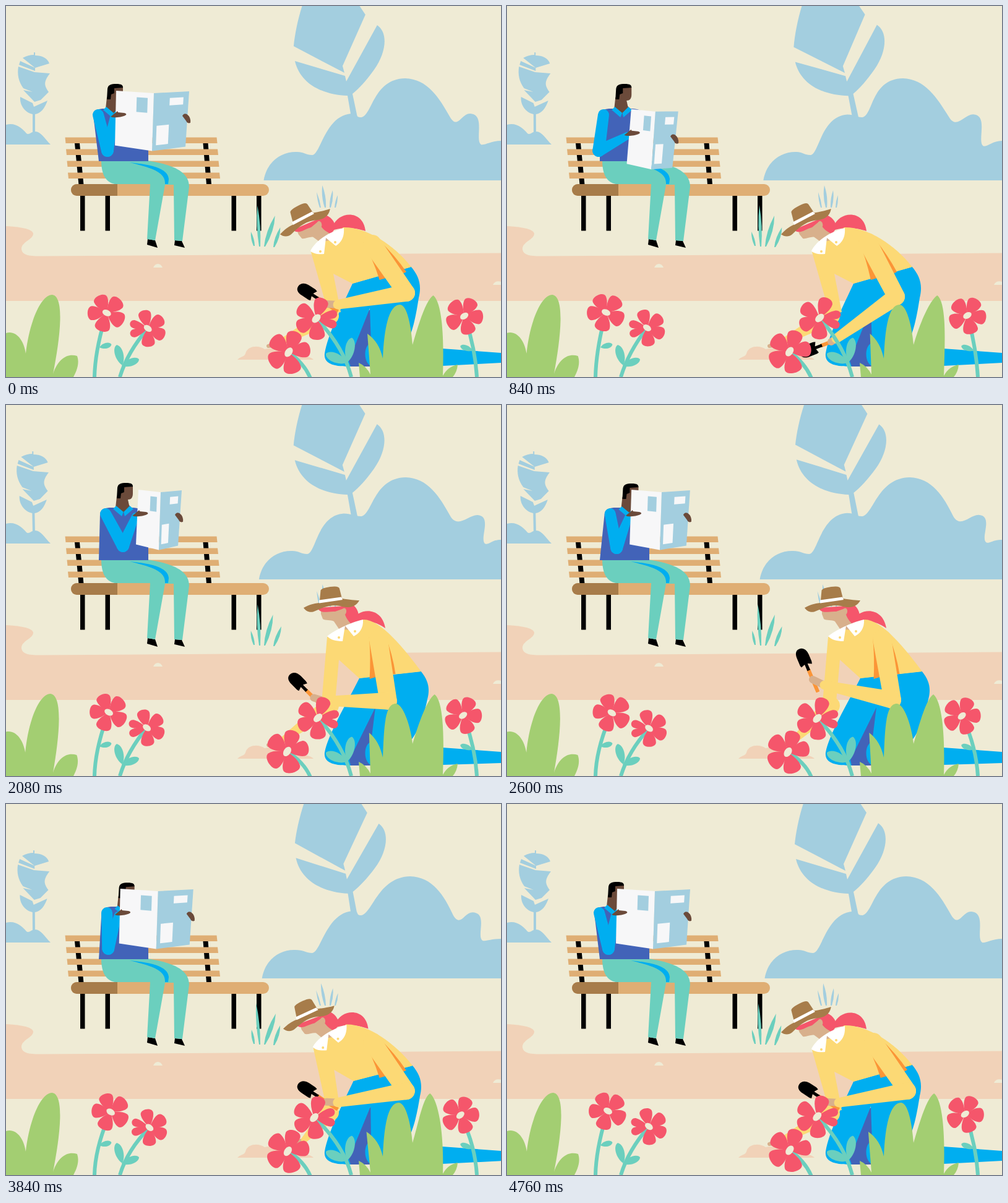
An HTML page for the animation above (4.8 s loop, 800x600 px).

```html
<!DOCTYPE html>
<html lang="en">
<head>
<meta charset="utf-8">
<title>Park afternoon</title>
<style>
html, body { margin: 0; width: 100%; height: 100%; overflow: hidden; background: #efebd5; }
svg { display: block; width: 800px; height: 600px; }
</style>
</head>
<body>
<svg id="stage" viewBox="0 0 800 600"></svg>
<script>
const LOOP = 4800, STEP = 40;
const C = {
  bg: '#efebd5', sky: '#a3cedf', sand: '#f1d2b8', wood: '#dfae74', dark: '#a77c4a',
  teal: '#6bcfbe', blue: '#00aef0', navy: '#4263b8', brown: '#6b4a3a', paper: '#f7f7f8',
  green: '#a3ce72', red: '#f5566b', yellow: '#fcd975', orange: '#fb9537', tan: '#d8b08c',
  white: '#fff', black: '#000'
};
let now = 0;

// Eased progress of the loop time from a to b.
function ease(a, b) {
  const u = Math.min(1, Math.max(0, (now - a) / (b - a)));
  return u * u * (3 - 2 * u);
}

// One swing per loop, highest at the peak time.
const wave = (mid, amp, peak) => mid + amp * Math.cos(2 * Math.PI * (now - peak) / LOOP);

const lerp = (a, b, u) => a + (b - a) * u;
const lerpPt = (a, b, u) => [lerp(a[0], b[0], u), lerp(a[1], b[1], u)];
const add = (p, x, y) => [p[0] + x, p[1] + y];
const path = (d, fill) => `<path d="${d}" fill="${fill}"/>`;
const poly = (pts, fill) => path('M' + pts.map(p => p.join(' ')).join('L') + 'Z', fill);
const rect = (x, y, w, h, fill, r = 0) =>
  `<rect x="${x}" y="${y}" width="${w}" height="${h}" rx="${r}" fill="${fill}"/>`;
const group = (transform, body) => `<g transform="${transform}">${body}</g>`;
const dot = (p, r, fill) => `<circle cx="${p[0]}" cy="${p[1]}" r="${r}" fill="${fill}"/>`;

// Blend two paths that share the same commands.
function mix(a, b, u) {
  const to = b.match(/-?[\d.]+/g);
  let i = 0;
  return a.replace(/-?[\d.]+/g, n => lerp(+n, +to[i++], u).toFixed(2));
}

// Tapered rounded segment.
function limb(a, ra, b, rb, fill) {
  const dx = b[0] - a[0], dy = b[1] - a[1], len = Math.hypot(dx, dy) || 1;
  const at = (p, r) => `${p[0] - dy / len * r} ${p[1] + dx / len * r}`;
  return path(`M${at(a, ra)}L${at(b, rb)}A${rb} ${rb} 0 0 0 ${at(b, -rb)}` +
    `L${at(a, -ra)}A${ra} ${ra} 0 0 0 ${at(a, ra)}Z`, fill);
}

// Lean a shape sideways about its base; dx is the shift at height h.
const sway = (y, h, dx, body) =>
  group(`matrix(1 0 ${-dx / h} 1 ${dx * y / h} 0)`, body);

function backdrop() {
  const small = path('M45 75H47V80C58 80 67 84 70 93L47 100L27 84Q36 79 45 79Z' +
    'M23 89L47 100V105L21 95Z' +
    'M20 98L46 107L71 109C60 123 62 129 69 139L56 152L46 155L28 136L43 139L28 133C20 122 18 110 20 98Z' +
    'M23 147L43 157L45 163L67 153C63 165 56 174 47 175V207H43V175C30 172 22 160 23 147Z', C.sky);
  const tall = path('M480 -4C472 20 467 45 465 65L547 108L544 97L581 14L569 -4Z' +
    'M467 89L548 113L550 122L600 31C618 43 615 75 595 103C582 121 571 133 560 142' +
    'L568 180H558L552 145C515 144 476 128 467 89Z', C.sky);
  const l = wave(412.5, 4, 0), c = wave(491, 4.5, 4300), m = wave(553, 8, 4160);
  const my = wave(174.5, 1.5, 1500), x = wave(647, 7.5, 3400), d = wave(729, 4.5, 3400);
  const b = wave(756, 6, 2400), by = wave(176, 2, 2300);
  const e = wave(772, 3.5, 2400), ey = wave(224, 3, 1100);
  const bush = `M${l} 282C${l + 5} 252 ${l + 28} 235 ${l + 54} 236` +
    `C${c - 14} 236 ${c - 9} 241 ${c} 241C${c + 14} 241 ${m - 43} ${my + 3} ${m} ${my}` +
    `C${m + 12} ${my} 564 180 574 180C592 178 ${x - 52} 118 ${x} 117` +
    `C${x + 36} 118 ${x + 55} 148 ${d - 10} 180C${d + 2} 200 ${b - 14} ${by} ${b} ${by}` +
    `C${b + 26} ${by + 1} ${e - 12} ${ey - 6} ${e} ${ey}C${e + 8} ${ey} 785 218 800 218V282Z`;
  return rect(0, 0, 800, 600, C.bg) +
    path('M0 192C16 188 26 198 33 206C37 209 40 204 46 203C56 202 62 214 72 224H0Z', C.sky) +
    sway(207, 110, wave(-1.2, 1.2, 0), small) +
    group(`rotate(${wave(.1, 1, 3480)} 562 175)`, tall) +
    path(bush, C.sky) +
    path('M0 356C20 357 43 360 44 368C44 378 25 381 25 393C26 405 43 404.5 60 404.5L800 399.5V477H0Z', C.sand) +
    path('M238 423C241 415 250 415 253 423ZM787 451C790 444 797 445 800 446V451Z', C.bg) +
    path('M374 572C380 566 385 568 387 562C391 548 410 549 418 555C430 553 445 552 455 560C470 567 490 564 497 572Z', C.sand);
}

function bench() {
  let slats = '';
  for (let i = 0; i < 4; i++) {
    slats += path(`M${95.5 + 1.5 * i} ${212.5 + 19 * i}h245l1 9.5h-245z`, C.wood);
  }
  return path('M111 222H119L125.5 289H117.5ZM318.5 222H326.5L332 289H324Z', C.black) + slats +
    [120, 160.5, 364.5, 405].map(x => rect(x, 306, 7.5, 57.5, C.black)).join('') +
    rect(105, 288, 320, 19, C.wood, 9.5) +
    path('M180 288H114.5A9.5 9.5 0 0 0 114.5 307H180Z', C.dark);
}

function reader() {
  const drop = ease(100, 1050), rise = ease(1450, 2080);
  const unfold = ease(2080, 3100), back = ease(3160, 4760);
  const open = 1 - drop + unfold, high = 1 - drop + rise;

  // Newspaper: a spine with two pages that widen as it opens.
  const b = [239 + drop + 10 * rise - 11 * back, 175 - 34 * high];
  const e = add(b, lerp(-7, -3, high), 93.5);
  const a = add(b, -36 - 25 * open, -4), f = add(e, -37 - 23 * open, -9);
  const c = add(b, 34 + 23 * open, -3 * high), d = add(e, 31 + 23 * open, -2 - 5 * high);
  const box = (p, q, r, s, u0, u1, v0, v1, fill) => {
    const at = (u, v) => lerpPt(lerpPt(p, q, u), lerpPt(s, r, u), v);
    return poly([at(u0, v0), at(u1, v0), at(u1, v1), at(u0, v1)], fill);
  };

  const hx = -12 + 14 * drop + 2 * rise + 14.5 * unfold - 30.5 * back;
  const sx = 141 + 10 * drop + rise + 11 * unfold - 22 * back;
  const shoulder = [149 + 8 * drop + 4 * rise + 11 * unfold - 23 * back, 176];
  const elbow = [164 - 18 * drop + 43 * rise - 23 * unfold - 2 * back, 234 - 6 * rise + 6 * unfold];
  const hand = add(lerpPt(a, f, .44), 5, 0), wrist = add(hand, -8, 4);
  const far = lerpPt(c, d, .49);

  const head = path('M175 148L181 140L186 131H201V143C201 150 198 153 193 153L195 162L198 166L186 175L173 166Z', C.brown) +
    path('M175 151L176 134C177 127 182 126 190 126C199 126 201 128 201 132L187 133V141L182 143L181 151Z', C.black) +
    path('M169 168L174 163L186 173L183 180ZM202 168L196 163L186 173L188 180Z', C.blue);
  return path('M229 377L241 379L245 391L228 386ZM273 379L284 380L289 391L272 387Z', C.black) +
    path('M154 250H228C260 255 296 264 296 292L285 380L272 379L271 289H257L241 379L228 377L233 288H176C160 285 154 270 154 250Z', C.teal) +
    path('M200 253C238 257 262 263 263 280L262 288H257C258 268 235 262 200 253Z', C.blue) +
    path(`M${sx} 176Q${sx + 1} 167 ${sx + 15} 166H${sx + 52}Q${sx + 68} 167 ${sx + 70} 173L230 226V251H150Z`, C.navy) +
    group(`translate(${hx} ${2 * unfold - 2 * back})`, head) +
    limb(shoulder, 9, elbow, 10, C.blue) + limb(elbow, 10, wrist, 6, C.blue) +
    poly([a, b, e, f], C.paper) + poly([b, c, d, e], C.sky) +
    box(a, b, e, f, .55, .84, .09, .35, C.sky) +
    box(b, c, d, e, .46, .85, .1, .23, C.paper) + box(b, c, d, e, .11, .47, .57, .91, C.paper) +
    group(`translate(${hand})`, path('M-13 3Q-8 -1 -2 -6L-1 -4L9 -3Q13 -2 12 0Q8 3 -2 4Q-9 5 -13 3Z', C.brown)) +
    group(`translate(${far})`, path('M-8 -4Q-6 -9 -1 -7Q6 -2 5 7Q0 9 -2 4Z', C.brown));
}

function grass() {
  const s = wave(0, 2, 1100), r = wave(-1.5, 2.5, 4000), q = wave(1, 1, 1800);
  const blade = (x, y, tx, ty, w) => {
    const m = (y + ty) / 2;
    return `M${x - 1} ${y}Q${lerp(x, tx, .4) - w} ${m} ${tx} ${ty}Q${lerp(x, tx, .65) + w} ${m} ${x + 1} ${y}Z`;
  };
  return path(blade(410, 389, 406 + s, 322, 5) + blade(418, 389, 435 + r, 339, 5) +
      blade(433, 390, 443 + q, 358, 4) + blade(401, 388, 396 - s / 2, 365, 4), C.teal) +
    path(blade(508, 326, 502 + s / 2, 301, 3) + blade(516, 326, 511 + s, 290, 5) +
      blade(524, 326, 528 + r / 3, 298, 3) + blade(532, 326, 536 + r / 2, 306, 2), C.sky);
}

// Working arm as shoulder, elbow, wrist, grip and trowel angle.
const ARM = {
  rest: '592 385 647 464 536 483 518 482 213',
  dig: '583 382 629 470 532 538 524 543 159',
  drag: '590 380 603 484 518 552 507 558 163',
  raise: '606 378 623 477 513 453 494 444 247'
};

function arm() {
  let s = mix(ARM.rest, ARM.dig, ease(50, 840));
  s = mix(s, ARM.drag, ease(840, 1440));
  s = mix(s, ARM.raise, ease(1440, 2400));
  const n = mix(s, ARM.rest, ease(3160, 3880)).split(' ').map(Number);
  return { shoulder: n.slice(0, 2), elbow: n.slice(2, 4), wrist: n.slice(4, 6), grip: n.slice(6, 8), aim: n[8] };
}

function gardener() {
  const p = ease(950, 2080) - ease(3160, 4050);
  const m = (a, b, fill) => path(mix(a, b, p), fill);
  const { shoulder, elbow, wrist, grip, aim } = arm();
  const bent = [524, 501 - 15 * p];
  const palm = 424 + 36 * (ease(2080, 3160) - ease(3840, 4700));

  const head = path('M509 329V338L512 346C516 349 525 347 530 350L538 362L556 364L558 345L549 328Z', C.tan) +
    path('M503 328C509 339 520 333 532 334L546 329C547 340 551 348 559 355L569 348C571 340 570 332 562 324Z', C.red) +
    path('M543 331C548 324 553 333 548 339Z', C.tan) +
    path('M481 328C490 323 497 321 506 320L543 313C555 315 565 316 571 316C565 328 552 329 540 325C522 322 510 329 500 333C492 337 485 334 481 328Z', C.dark) +
    path('M507 316L508.5 300Q509 296 524 294Q538 292 539 297L543 313Z', C.dark) +
    path('M506 315.5L542 310.5L544 315L506 320.5Z', C.white);
  const mid = lerpPt([484, 350.5], [526, 324], p);

  // Sleeve creases follow both edges of the upper arm.
  const [x, y] = shoulder, dx = elbow[0] - x, dy = elbow[1] - y;
  const side = 15 * Math.hypot(dx, dy) / dy;
  const armX = h => x + dx * (h - y) / dy;
  const lx = armX(441) - side - 9, rx = armX(432) + side + 4;
  const folds = `M${x - 15} ${y - 3}Q${(x + lx) / 2 - 5} 408 ${lx} 443L${lx + 20} 437Z` +
    `M${x + 11} ${y - 6}Q${(x + rx) / 2 + 9} 403 ${rx} ${lerp(430, 435, p)}L${rx - 12} 436Z`;

  const trowel = rect(-22, -3, 40, 6, C.orange, 1) + rect(16, -2.5, 12, 5, C.black) +
    path('M25 -9L28 -10H41C49 -10 54 -7 54 -1C54 6 48 10 40 10H28L24 9L27 3V-3Z', C.black);

  return path('M578 500L550 583H600L590 545H620L600 480Z', C.navy) +
    m('M560 449L655 422L588 489L554 574L557 583C532 583 513 580 515 562C520 530 545 482 560 449Z',
      'M571 442L671 431L597 489L555 574L557 583C532 583 513 580 515 562C520 533 552 480 571 442Z', C.blue) +
    m('M588 489L654 421C668 437 672 452 667 472C662 505 655 540 640 556L705 554L800 561V577L705 582L592 583C577 580 577 548 590 545Z',
      'M597 489L670 430C684 447 685 460 681 476C675 505 664 540 640 556L705 554L800 561V579L705 582L592 583C577 580 577 548 590 545Z', C.blue) +
    m('M560 449L655 422L650 460L590 492Z', 'M571 442L671 431L666 465L598 492Z', C.blue) +
    m('M528 357C536 332 577 328 581 364C568 360 550 356 530 362Z',
      'M558 350C570 326 608 326 613 361C600 352 585 346 562 354Z', C.red) +
    limb([palm + 17, 546], 4.5, [palm, 550], 3, C.tan) +
    limb(bent, 14, [palm + 22, 543], 5, C.yellow) +
    m('M493 398L545 358C582 357 627 386 655 422L560 449L529 433L541 495L517 500L514 472Z',
      'M519 375L578 347C606 347 645 396 671 431L571 442L538 412L532 480L509 490L511 470Z', C.yellow) +
    group(`translate(${mid}) rotate(${-19.5 * (1 - p)}) translate(-526 -324)`, head) +
    m('M492 396C500 380 520 366 546 359C547 372 543 382 533 388L517 375L514 401C503 402 495 400 492 396Z',
      'M519 374C530 365 555 352 577 347C578 362 570 370 562 374L548 357L544 382C533 382 525 380 519 374Z', C.white) +
    dot(lerpPt([508, 397], [538, 376], p), 2, C.yellow) + dot(lerpPt([532, 382], [564, 366], p), 2, C.yellow) +
    path(folds, C.orange) +
    group(`translate(${grip}) rotate(${aim})`, trowel) +
    limb(wrist, 6, grip, 6, C.tan) +
    limb(shoulder, 15, elbow, 14, C.yellow) + limb(elbow, 14, wrist, 7.5, C.yellow);
}

function bushes() {
  const l = wave(585, 2.5, 1500), m = wave(633.5, 3.5, 4700), r = wave(690.5, 5.5, 1200);
  const left = 'M0 529C16 524 29 540 32 562C38 510 57 467 75 467C96 470 87 540 76 595' +
    'C84 570 100 561 115 566C120 580 112 594 109 600H0Z';
  return sway(600, 133, wave(-1.5, 1.5, 4400), path(left, C.green)) +
    path(`M572 600L570 577Q582 582 589 596L${l} 530Q603 543 609 570C611 520 ${m - 18} 483 ${m} 483` +
      `C${m + 13} 484 655 525 657 548C668 510 ${r - 11} 475 ${r} 468C${r + 15} 480 708 540 706 598` +
      `Q714 583 730 580Q729 592 722 600Z`, C.green);
}

const leaf = (x, y, turn, len, w) => group(`translate(${x} ${y}) rotate(${turn})`,
  path(`M0 0C${len * .3} ${-w} ${len * .9} ${-w} ${len} 0C${len * .9} ${w} ${len * .3} ${w} 0 0Z`, C.teal));

// Petals point along the given angles, each as wide as its neighbours allow.
function flower(stem, x, y, swing, peak, size, tilt, angles) {
  const px = wave(x, swing, peak), py = wave(y, 1.5, 3300);
  const n = angles.length;
  let out = '';
  angles.forEach((a, i) => {
    const gap = k => (angles[(i + k + 1) % n] - angles[(i + k) % n] + 360) % 360;
    const w = 21.5 * Math.sin(Math.min(gap(0), gap(n - 1)) * Math.PI / 360);
    out += group(`rotate(${a})`,
      path(`M0 0C8 ${-w * .5} 16 ${-w} 24 ${-w}C34 ${-w} 34 ${w} 24 ${w}C16 ${w} 8 ${w * .5} 0 0Z`, C.red));
  });
  out += `<ellipse rx="7.5" ry="5" transform="rotate(${tilt})" fill="${C.bg}"/>`;
  return `<path d="${stem} ${px} ${py}" fill="none" stroke="${C.teal}" stroke-width="6"/>` +
    group(`translate(${px} ${py}) rotate(${wave(0, swing * .9, peak)}) scale(${size})`, out);
}

function flowers() {
  return leaf(151, 552, -14, 20, 6) +
    leaf(188, 581, -106, 34, 9) + leaf(187, 582, -21, 30, 8) +
    leaf(552, 576, -80, 40, 10) + leaf(551, 577, 203, 37, 10) + leaf(754, 557, 200, 21, 6) +
    flower('M143 600Q144 555', 165.5, 497, 5.5, 3200, .98, 28, [-112, -42, 32, 110, 182]) +
    flower('M184 600Q196 560', 229, 522, 3, 3650, .95, 35, [-103, -35, 25, 88, 160, 197]) +
    flower('M558 600Q545 550', 502, 506, 4, 1300, 1.1, -45, [-148, -72, -14, 20, 88, 153]) +
    flower('M492 602Q482 578', 455.5, 560.5, 1.5, 300, 1.12, -55, [-140, -72, -10, 76, 148]) +
    flower('M761 600Q758 550', 738.5, 502, 5.5, 900, .97, -35, [-137, -65, 2, 72, 150]);
}

const stage = document.getElementById('stage');

function draw(ms) {
  now = Math.floor((ms % LOOP) / STEP) * STEP;
  stage.innerHTML = backdrop() + bench() + reader() + grass() + gardener() + bushes() + flowers();
}

let start = null;
function tick(ms) {
  if (start === null) start = ms;
  draw(Math.max(0, ms - start));
  requestAnimationFrame(tick);
}
draw(0);
requestAnimationFrame(tick);
</script>
</body>
</html>
```
